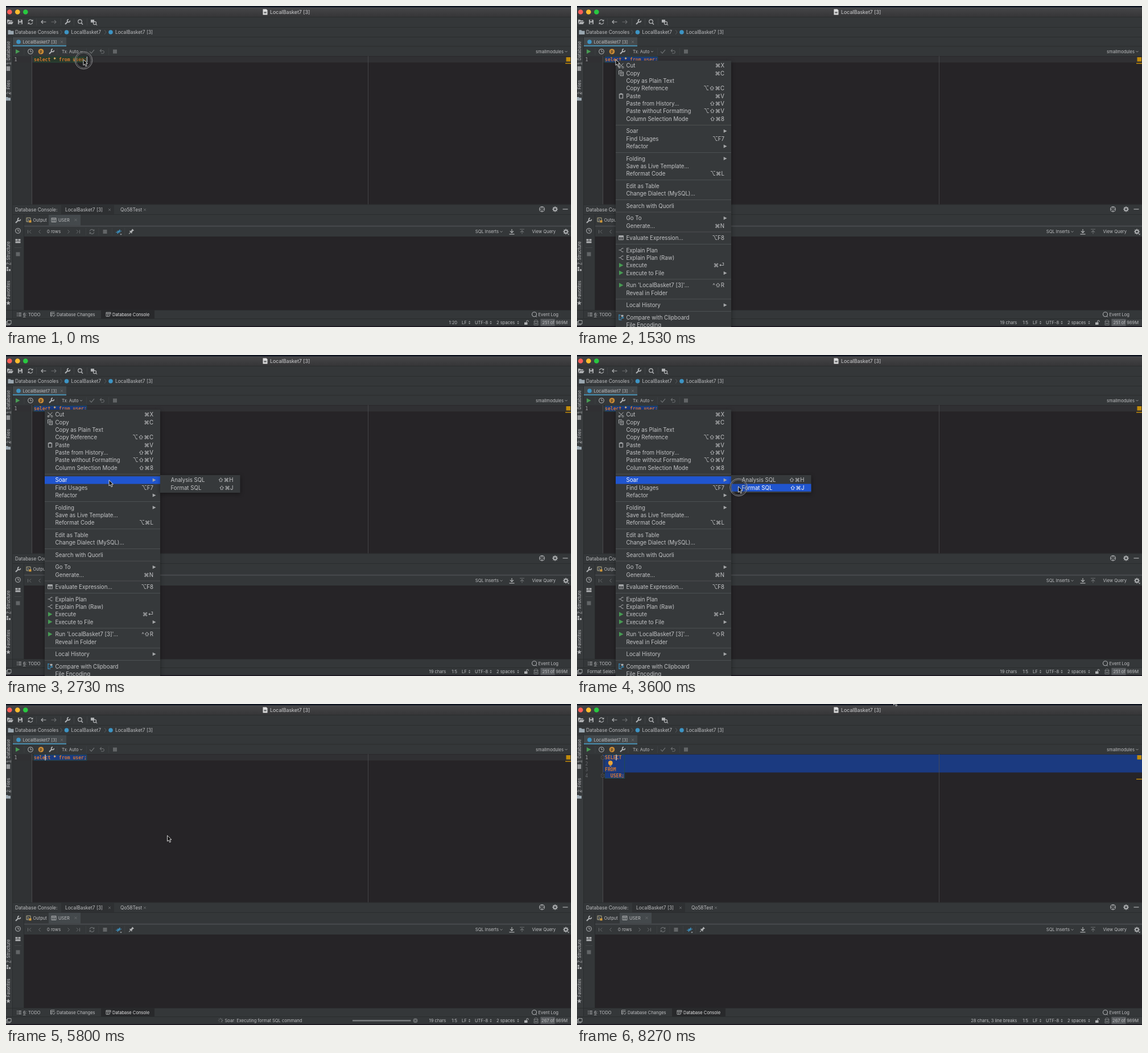
Write an HTML page with a canvas that moves like this. It is 993 px wide and 564 px high and loops after 8.34 s.

```html
<!DOCTYPE html>
<html lang="en">
<head>
<meta charset="utf-8">
<title>SQL console</title>
<style>
html, body { margin: 0; width: 100%; height: 100%; overflow: hidden; background: #343739; }
canvas { display: block; width: 993px; height: 564px; }
</style>
</head>
<body>
<canvas id="stage"></canvas>
<script>
const W = 993, H = 564, LOOP = 8340;
const canvas = document.getElementById('stage');
const dpr = window.devicePixelRatio || 1;
canvas.width = Math.round(W * dpr);
canvas.height = Math.round(H * dpr);
let g = canvas.getContext('2d');

const UI = 'Inter, "DejaVu Sans", sans-serif';
const MONO = '"DejaVu Sans Mono", "Liberation Mono", monospace';
const SMALL = 7.55, MED = 8.35, MENU = 9.7;
const CW = 4.89, LH = 10.55, X0 = 49;
const C = {
  editor: '#262427', panel: '#343739', tab: '#44494c', dark: '#28292b', line: '#292b2c',
  text: '#bdbec0', dim: '#6a6d6f', icon: '#afb1b3', blue: '#3d94c4', green: '#489b54',
  orange: '#d5782f', yellow: '#ffc66d', sel: '#1b3a80', hover: '#2055cf', warn: '#c08a0b',
  frame: '#25503f', menu: '#36393b', item: '#c3c4c6', bright: '#ffffff'
};
const DB = 'LocalBasket7', CONSOLE = DB + ' [3]';

// ---- helpers ----
function box(x, y, w, h, color) { g.fillStyle = color; g.fillRect(x, y, w, h); }
function dot(x, y, r, color) { g.fillStyle = color; g.beginPath(); g.arc(x, y, r, 0, 7); g.fill(); }
function ring(x, y, r, color, width = 1) {
  g.strokeStyle = color; g.lineWidth = width;
  g.beginPath(); g.arc(x, y, r, 0, 7); g.stroke();
}
function outline(x, y, w, h, color, width = 0.8) {
  g.strokeStyle = color; g.lineWidth = width; g.strokeRect(x, y, w, h);
}
// y is the middle of the capitals
function text(s, x, y, size = SMALL, color = C.text, align = 'left', weight = 400) {
  g.font = `${weight} ${size}px ${UI}`;
  g.fillStyle = color; g.textAlign = align; g.textBaseline = 'alphabetic';
  g.fillText(s, x, y + size * 0.36);
  return g.measureText(s).width;
}
function code(s, x, y, color, weight = 700) {
  g.font = `${weight} 8.12px ${MONO}`;
  g.fillStyle = color; g.textAlign = 'left'; g.textBaseline = 'alphabetic';
  g.fillText(s, x, y + 2.9);
}
function stroke(x, y, d, color = C.icon, width = 1) {
  g.save(); g.translate(x, y);
  g.strokeStyle = color; g.lineWidth = width; g.stroke(new Path2D(d));
  g.restore();
}
function fill(x, y, d, color = C.icon) {
  g.save(); g.translate(x, y);
  g.fillStyle = color; g.fill(new Path2D(d));
  g.restore();
}
const cross = (x, y) => stroke(x, y, 'M-2-2L2 2M2-2L-2 2', '#6f7274', 0.8);
const chevron = (x, y) => stroke(x, y, 'M-2-1L0 1L2-1', '#9a9c9e', 0.9);
const updown = (x, y) => fill(x, y, 'M-1.7-.8L0-3L1.7-.8ZM-1.7 .8L0 3L1.7 .8Z', '#9a9c9e');
const play = (x, y) => fill(x, y, 'M-3.5-4L4 0L-3.5 4Z', C.green);
const folder = (x, y, s = 1) => {
  g.save(); g.translate(x, y); g.scale(s, s);
  fill(0, 0, 'M-5-3.8h4l1.2 1.5H5V4H-5Z', '#9aa7b0'); g.restore();
};
function wrench(x, y) {
  stroke(x, y, 'M-4 4L1-1', C.icon, 2.1);
  stroke(x, y, 'M4.4-2.2A2.4 2.4 0 1 1 2-4.4', C.icon, 1.7);
}
function clock(x, y) { ring(x, y, 4.3, C.icon, 1.1); stroke(x, y, 'M0-2.8V.3H2.4'); }
function reload(x, y, color) {
  stroke(x, y, 'M-3.8-.8A3.8 3.8 0 0 1 3-2.4M3.8 .8A3.8 3.8 0 0 1-3 2.4', color, 1.2);
  fill(x, y, 'M4.4-4.4V-1H1ZM-4.4 4.4V1H-1Z', color);
}
function gear(x, y) {
  ring(x, y, 2.7, C.icon, 1.8);
  for (let i = 0; i < 8; i++) {
    const a = i * Math.PI / 4;
    dot(x + 4 * Math.cos(a), y + 4 * Math.sin(a), 0.9, C.icon);
  }
}
function grid(x, y, color = C.icon) { stroke(x, y, 'M-4-3.5H4V3.5H-4ZM-4-1.6H4M-1.3-1.6V3.5M1.3-1.6V3.5', color, 0.9); }
function bars(x, y) { stroke(x, y, 'M-4-2.5h1.5M-4 0h1.5M-4 2.5h1.5M-1.2-2.5H4M-1.2 0H4M-1.2 2.5H4'); }
function upright(s, y, underline) {
  g.save(); g.translate(4, y); g.rotate(-Math.PI / 2);
  text(s, 0, 0);
  if (underline) box(0, 3.8, 4.2, 0.7, C.text);
  g.restore();
}

// ---- fixed window parts ----
function drawWindow() {
  box(0, 0, W, H, C.panel);
  box(0, 0, W, 3, '#0b101c');
  const bar = g.createLinearGradient(0, 3, 0, 19);
  bar.addColorStop(0, '#454547'); bar.addColorStop(1, '#363638');
  g.fillStyle = bar; g.fillRect(0, 3, W, 16);
  box(0, 2.5, W, 0.8, '#5b5b5e');
  ['#ff5f57', '#febc2e', '#28c840'].forEach((c, i) => dot(6.3 + 14 * i, 10.5, 4.3, c));
  fill(455.5, 10.5, 'M-4-5H2L4-3V5H-4Z', '#dcdcdc');
  box(453.3, 10, 4.4, 3, '#77797b');
  text(CONSOLE, 464, 10.8, 8.9, '#cfcfd1');

  // main toolbar
  box(0, 19, W, 0.8, C.line);
  fill(7, 28, 'M-5 4V-4h3.5l1 1.3H4V-1H-2.5ZM-1.8-.2H6L3.8 4H-4Z');
  fill(25, 28, 'M-4-4H3L4-3V4H-4Z');
  box(22.8, 24.4, 3.6, 2.4, C.panel); box(22.6, 29, 4.8, 2.6, C.panel);
  reload(43, 28, C.icon);
  stroke(66, 28, 'M4.5 0H-4M-1-3L-4 0L-1 3', C.icon, 1.2);
  stroke(84, 28, 'M-4.5 0H4M1-3L4 0L1 3', C.dim, 1.2);
  wrench(108, 28);
  ring(130, 27.3, 3.3, C.icon, 1.3); stroke(130, 28, 'M2.2 1.8L5 4.6', C.icon, 1.5);
  box(149, 24, 6, 5, C.icon); ring(156, 30, 2.6, C.icon, 1.2); stroke(156, 30, 'M2 1.8L4 3.8', C.icon, 1.2);
  [53, 96, 119, 142].forEach(x => box(x, 22, 0.7, 12, '#45484a'));

  // breadcrumbs
  box(0, 37, W, 0.8, C.line);
  folder(8.5, 46);
  text('Database Consoles', 16, 46, MED);
  stroke(97, 46, 'M-1.5-4L1.5 0L-1.5 4', '#606365', 0.8);
  dot(106.5, 46, 3.8, C.blue);
  text(DB, 114.5, 46, MED);
  stroke(174.5, 46, 'M-1.5-4L1.5 0L-1.5 4', '#606365', 0.8);
  dot(184, 46, 3.8, C.blue);
  text(CONSOLE, 192, 46, MED);

  // editor tab and its toolbar
  box(0, 54, W, 0.8, C.line);
  box(12, 54.8, 94, 16, C.tab);
  box(12, 69, 94, 2, '#478bab');
  dot(22, 63, 3.8, C.blue);
  text(CONSOLE, 29.5, 63);
  cross(98, 63);
  box(106, 70.4, W - 106, 0.8, C.line);
  play(20.5, 80); clock(43, 80);
  dot(61.5, 80, 4.8, '#c98b36'); text('p', 61.5, 79.4, 7, '#3a3024', 'center', 600);
  wrench(80, 80);
  text('Tx: Auto', 98, 80); chevron(132, 80);
  stroke(151, 80, 'M-4 0L-1 3L4-3', C.dim, 1.2);
  stroke(169, 80, 'M-3.5-1.5H1.5A2.4 2.4 0 0 1 1.5 3.2H-2M-1.3-4L-3.8-1.5L-1.3 1', C.dim, 1.1);
  box(188, 76.5, 7, 7, '#626567');
  [31.5, 89.5, 141, 180].forEach(x => box(x, 74, 0.7, 12, '#404345'));
  text('smallmodules', 980, 80, SMALL, C.text, 'right'); chevron(984.5, 80);

  // editor
  box(11, 88, 34, 260.5, '#303234');
  box(45, 88, W - 45, 260.5, C.editor);

  // left stripe
  box(0, 54.8, 11, 494, '#383b3d');
  box(11, 54.8, 0.8, 494, C.line);
  upright('1: Database', 103, true);
  stroke(4, 110, 'M-3.2-3H3.2M-3.2-1H3.2M-3.2 1H3.2M-3.2 3H3.2', C.icon, 1.3);
  upright('2: Files', 155.5, true);
  folder(4, 163, 0.8);
  upright('7: Structure', 455, true);
  fill(4, 462, 'M-3-3.5h3v3h-3ZM-3 .5h3v3h-3ZM1 .5h3v3h-3Z');
  upright('Favorites', 515);
  const star = [];
  for (let i = 0; i < 10; i++) {
    const r = i % 2 ? 1.8 : 4.4, a = i * Math.PI / 5;
    star.push(`${(r * Math.sin(a)).toFixed(2)} ${(-r * Math.cos(a)).toFixed(2)}`);
  }
  fill(4, 522, 'M' + star.join('L') + 'Z');

  // console panel
  box(11.8, 348.5, W, 0.8, C.line);
  box(97, 349.3, 93, 17, '#2e3032');
  text('Database Console:', 16, 357.5, MED);
  text(CONSOLE, 104, 357.5, MED); cross(182, 358);
  text('Qo58Test', 201, 357.5, MED); cross(244, 358);
  ring(942, 357, 4.4, C.icon, 1.1);
  stroke(942, 357, 'M0-4V-1.3M0 4V1.3M-4 0H-1.3M4 0H1.3', C.icon, 1.1);
  gear(965, 357);
  stroke(983, 357, 'M-4.5 0H4.5', C.icon, 1.2);
  box(11.8, 366, W, 0.8, C.line);
  box(75, 366.8, 56, 19, C.tab);
  stroke(39.5, 376, 'M-3.5-3.8H3.5V3H-3.5Z', '#b7b08a', 1);
  stroke(39.5, 376, 'M-1.8-2L.3 0L-1.8 2'); box(40.5, 376.5, 4, 4, '#d39a3a');
  text('Output', 47.5, 375.8);
  grid(84, 376); text('USER', 92, 375.8); cross(122.5, 375.8);
  box(31.5, 385.5, W, 2.5, '#44474a');
  box(31, 366.8, 0.8, 167, C.line);
  wrench(21, 377); clock(21, 395);
  fill(21, 413, 'M-4.5-3.5h4v3h-4ZM.5-3.5h4v3h-4ZM-4.5 .5h9v3h-9Z');
  box(15, 424, 12, 0.7, '#4a4d4f');
  box(17.5, 432.5, 7, 7, '#626567');
  stroke(41, 396.5, 'M3-3L0 0L3 3M-2.5-3V3', C.dim, 1);
  stroke(59, 396.5, 'M1.5-3L-1.5 0L1.5 3', C.dim, 1);
  text('0 rows', 72, 396.6);
  stroke(110, 396.5, 'M-1.5-3L1.5 0L-1.5 3', C.dim, 1);
  stroke(127, 396.5, 'M-3-3L0 0L-3 3M2.5-3V3', C.dim, 1);
  reload(151, 396.5, C.dim);
  box(170.5, 393, 7, 7, '#626567');
  [140, 162.5, 186, 208].forEach(x => box(x, 390, 0.7, 13, '#404345'));
  stroke(198, 396.5, 'M-5 1H0M-2.5-1.5L0 1L-2.5 3.5M5-1H0M2.5-3.5L0-1L2.5 1.5', C.blue, 1.2);
  fill(202, 401.5, 'M-1.8-1H1.8L0 1Z');
  g.save(); g.translate(220, 396.5); g.rotate(Math.PI / 4);
  fill(0, 0, 'M-2-5H2V-4L1.4-3.5V-.8L3 .8V1.6H.5V5.5H-.5V1.6H-3V.8L-1.4-.8V-3.5L-2-4Z');
  g.restore();
  text('SQL Inserts', 866, 396.6, SMALL, C.text, 'right'); chevron(870.5, 396.5);
  stroke(889, 396.5, 'M0-4.5V2M-3-1L0 2L3-1M-4.5 4.3H4.5', C.icon, 1.2);
  stroke(907, 396.5, 'M0 4V-2M-3 1L0-2L3 1M-4-4.2H4', C.dim, 1.1);
  text('View Query', 966, 396.6, SMALL, C.text, 'right');
  gear(984, 396.5); fill(988.5, 401.5, 'M-1.8-1H1.8L0 1Z');
  box(31.8, 405, W, 129, C.editor);

  // tool window bar
  box(0, 534, W, 0.8, C.line);
  box(167, 534.5, 94, 14.5, C.dark);
  bars(23, 542); text('6: TODO', 30, 542); box(30, 546.2, 4.4, 0.7, C.text);
  stroke(82, 541.5, 'M-3.5-3.5H3.5M-3.5-1H3.5M-3.5 1.5H0M-3.5-3.5V3.5H-1M0 2L2 4L4.5 .5', C.icon, 0.9);
  text('Database Changes', 89, 542);
  grid(180, 541.8); box(181, 542.5, 4, 4, C.dark); stroke(182.5, 544, 'M-1.5-1.5L.5 0L-1.5 1.5', C.icon, 0.9);
  text('Database Console', 187, 542, SMALL, '#e4e4e5');
  ring(928.5, 541.7, 4, C.icon, 1.1); stroke(928.5, 541.7, 'M2.5 3L4.5 4.8');
  text('Event Log', 971, 542, SMALL, C.text, 'right');

  // status bar
  box(0, 549, W, 0.8, C.line);
  stroke(5, 556, 'M-2.5-3.5H4V2.5H-2.5ZM-2.5-1.5H-4.5V4.2H2V2.5', C.icon, 0.9);
  text('LF', 801, 556.4); updown(814.5, 556.3);
  text('UTF-8', 824, 556.4); updown(852, 556.3);
  text('2 spaces', 862, 556.4); updown(900, 556.3);
  box(911, 555.8, 5.5, 4.2, C.icon);
  stroke(914, 555.8, 'M.8 0V-1.8A1.6 1.6 0 0 1 4-1.8V-.8', C.icon, 1);
  ring(931.5, 555, 3.4, '#808385', 0.9);
  stroke(931.5, 556, 'M-4-1.5H4M-2 1.5H2M-3.5 1V4.5H3.5V1', '#808385', 0.9);
}

const base = document.createElement('canvas');
function bake() {
  base.width = canvas.width; base.height = canvas.height;
  const screen = g;
  g = base.getContext('2d');
  g.scale(dpr, dpr);
  drawWindow();
  g = screen;
}

// ---- context menu ----
const ROWS = [
  ['Cut', '⌘X', 'cut'], ['Copy', '⌘C', 'copy'], ['Copy as Plain Text'], ['Copy Reference', '⌥⇧⌘C'],
  ['Paste', '⌘V', 'paste'], ['Paste from History...', '⇧⌘V'], ['Paste without Formatting', '⌥⇧⌘V'],
  ['Column Selection Mode', '⇧⌘8'], 0,
  ['Soar', '>'], ['Find Usages', '⌥F7'], ['Refactor', '>'], 0,
  ['Folding', '>'], ['Save as Live Template...'], ['Reformat Code', '⌥⌘L'], 0,
  ['Edit as Table'], ['Change Dialect (MySQL)...'], 0,
  ['Search with Quorli'], 0,
  ['Go To', '>'], ['Generate...', '⌘N'], 0,
  ['Evaluate Expression...', '⌥F8', 'calc'], 0,
  ['Explain Plan', '', 'plan'], ['Explain Plan (Raw)', '', 'plan'],
  ['Execute', '⌘⏎', 'run'], ['Execute to File', '>', 'run'], 0,
  [`Run '${CONSOLE}'...`, '^⇧R', 'run'], ['Reveal in Folder'], 0,
  ['Local History', '>'], 0,
  ['Compare with Clipboard', '', 'compare'], ['File Encoding']
];
const SUBROWS = [['Analysis SQL', '⇧⌘H'], ['Format SQL', '⇧⌘J']];
const ROW = 13.33, GAP = 8.22;
const MENU_ICONS = {
  cut: (x, y) => { stroke(x, y, 'M-4-4L2.5 2M-4 4L4-4'); ring(x - 3, y + 3, 1.5, C.icon, 0.9); ring(x + 3, y + 3, 1.5, C.icon, 0.9); },
  copy: (x, y) => { stroke(x, y, 'M-1.5-2H4V4.5H-1.5ZM-4 2.5V-4.3H1.5M0 0H2.6M0 2H2.6'); },
  paste: (x, y) => { stroke(x, y, 'M-3-3.2H3V4H-3Z', C.icon, 1.2); box(x - 1.6, y - 4.6, 3.2, 2.2, C.icon); },
  calc: (x, y) => { grid(x, y); box(x - 4, y - 4, 8, 2.2, C.icon); },
  plan: (x, y) => { stroke(x, y, 'M-4 0H-1L1.5-3H4M-1 0L1.5 3H4'); },
  run: (x, y) => play(x, y),
  compare: (x, y) => { stroke(x, y, 'M-4.5-4H-1M-3.5-3V4.5H1M-1 1.5H4M1.5-1.5L4.5 1.5', C.blue, 1.2); box(x, y - 4, 4, 3, C.icon); }
};
function popup(x, y, w, h) {
  g.save();
  g.shadowColor = 'rgba(0,0,0,0.4)'; g.shadowBlur = 7 * dpr; g.shadowOffsetY = 2 * dpr;
  box(x, y, w, h, C.menu);
  g.restore();
}
function menuRow([label, key, icon], x, w, y, active) {
  const color = active ? C.bright : C.item;
  if (active) box(x, y - ROW / 2, w, ROW, C.hover);
  text(label, x + 18.5, y, MENU, color);
  if (icon) MENU_ICONS[icon](x + 9.5, y - 0.3);
  if (key === '>') fill(x + w - 10.5, y, 'M-2.8-3L3 0L-2.8 3Z', '#a5a7a9');
  else if (key) text(key, x + w - 12, y, MENU, color, 'right');
}
function drawMenu(mouse, submenu) {
  const near = y => Math.abs(mouse.y - y) < ROW / 2;
  popup(68, 96, 203, H);
  let y = 105;
  for (const row of ROWS) {
    if (row) {
      menuRow(row, 68, 203, y, submenu ? row[0] === 'Soar' : near(y) && mouse.t > 1650);
      y += ROW;
    } else {
      box(68, y - ROW / 2 + GAP / 2 - 0.3, 203, 0.9, '#505355');
      y += GAP;
    }
  }
  if (!submenu) return;
  popup(271, 211, 140.5, 31);
  SUBROWS.forEach((row, i) => {
    const cy = 219.8 + ROW * i;
    menuRow(row, 271, 140.5, cy, mouse.x > 271 && near(cy));
  });
}

// ---- motion ----
const PATH = [
  [0, 136, 94], [120, 136, 94], [700, 46, 95], [820, 46, 95], [1050, 68, 94], [1600, 68, 94],
  [2070, 110, 206], [2250, 113, 218], [2500, 122, 219], [3050, 277, 221], [3300, 283.5, 231],
  [7200, 283.5, 231], [7750, 556.5, -8.5], [LOOP, 556.5, -8.5]
];
function mouseAt(t) {
  let i = 1;
  while (i < PATH.length - 1 && PATH[i][0] <= t) i++;
  const [t0, x0, y0] = PATH[i - 1], [t1, x1, y1] = PATH[i];
  const p = (t - t0) / (t1 - t0), e = p * p * (3 - 2 * p);
  return { t, x: x0 + (x1 - x0) * e, y: y0 + (y1 - y0) * e };
}
const T = { bulb: 950, menu: 1450, sub: 2450, close: 3690, task: 3950, heap: 4800, format: 6500, bulb2: 7600 };

function drawBulb() {
  dot(58.8, 103.4, 3.9, '#e9a53a');
  box(57, 106.5, 3.6, 1.6, '#d08d2c');
  box(57.3, 108.6, 3, 1.2, '#a5a7a9');
}

function drawEditor(t, col, selected) {
  const done = t >= T.format;
  const y = n => 94.2 + LH * n;
  if (done) {
    box(X0, 88.7, W - X0, 3 * LH, C.sel);
    box(X0, 88.7 + 3 * LH, 7 * CW, LH, C.sel);
    outline(X0, 89, 7.1 * CW, 4 * LH - 0.6, C.frame);
    box(45.6, 88.7, 3.4, 3 * LH, '#1f3466');
  } else {
    box(11.8, 88.7, W, LH, '#303033');
    box(X0, 89, 19 * CW, 10, '#28382b');
    if (!selected) box(X0 + 14 * CW, 89, 4 * CW, 10, '#33472f');
    box(X0 + (19 - selected) * CW, 88.7, selected * CW, LH, C.sel);
    outline(X0, 89.2, 19 * CW, LH - 0.9, C.frame);
  }
  box(45, 88, 0.8, 260.5, '#545558');
  box(636, 88, 0.8, 260.5, '#4b4b4f');
  code('1', 14.5, y(0), '#a5a6a8', 400);
  if (done) {
    for (let n = 1; n < 4; n++) code(n + 1, 14.5, y(n), '#64676a', 400);
    for (const n of [0, 3]) {
      box(42.8, y(n) - 2.6, 5, 5.2, C.editor);
      outline(42.8, y(n) - 2.6, 5, 5.2, '#5f6264', 0.7);
      stroke(45.3, y(n), 'M-1.3 0H1.3', '#7a7d7f', 0.7);
    }
    code('SELECT', X0, y(0), C.orange);
    if (t < T.bulb2) code('*', X0 + 2 * CW, y(1), C.yellow);
    code('FROM', X0, y(2), C.orange);
    code('USER;', X0 + 2 * CW, y(3), C.orange);
  } else {
    code('select', X0, y(0), C.orange);
    code('*', X0 + 7 * CW, y(0), C.yellow);
    code('from user;', X0 + 9 * CW, y(0), C.orange);
  }
  box(984.5, 90, 7.5, 7.5, C.warn);
  box(983, done ? 131.3 : 100, 10, 1.5, C.warn);

  const focus = t < T.menu || t >= T.close;
  const phase = done ? t - 7000 + LOOP : t >= T.close ? t - 3600 : t < 900 ? 0 : t - 900;
  const blinkOn = done ? (t - 6000) % 1000 < 500 : phase % 1000 < 500;
  if (focus && blinkOn) box(X0 + col * CW - 0.2, 88.9, 1.3, 10.2, '#d6d6d8');
  if ((t >= T.bulb && t < T.menu) || t >= T.bulb2) drawBulb();
}

function drawStatus(t, col, selected, mouse) {
  const pos = '1:' + (col + 1);
  const w = text(pos, 793, 556.4, SMALL, C.text, 'right');
  const count = t >= T.format ? '28 chars, 3 line breaks' : selected ? selected + ' chars' : '';
  text(count, 793 - w - 10, 556.4, SMALL, C.text, 'right');

  box(939, 549.8, 54, 13, '#3b3e40');
  box(939.5, 549.8, 25, 13, '#5a5d60');
  text((t < T.heap ? 251 : 267) + ' of 989M', 987, 556.4, SMALL, C.text, 'right');

  if (t >= T.sub && t < T.close && mouse.x > 271)
    text((mouse.y < 226.4 ? 'Analysis' : 'Format') + ' Selected SQL', 18, 556.4);

  if (t >= T.task && t < T.format) {
    const step = Math.floor(t / 100);
    for (let i = 0; i < 8; i++) {
      const a = i * Math.PI / 4, c = Math.cos(a), s = Math.sin(a);
      g.strokeStyle = `rgba(190,192,194,${0.15 + 0.65 * ((i - step + 8000) % 8) / 7})`;
      g.lineWidth = 1;
      g.beginPath(); g.moveTo(377 + 2 * c, 556 + 2 * s); g.lineTo(377 + 4.3 * c, 556 + 4.3 * s); g.stroke();
    }
    text('Soar: Executing format SQL command', 384.5, 556.4);
    box(609, 555, 102.5, 2.6, '#75787a');
    dot(719.5, 556.2, 4, '#6b6e70');
    stroke(719.5, 556.2, 'M-1.6-1.6L1.6 1.6M1.6-1.6L-1.6 1.6', C.panel, 1);
  }
}

function drawPointer(t, { x, y }) {
  if (t < 780 || (t > 1320 && t < 1460) || (t > 3500 && t < T.close)) {
    dot(x + 0.5, y + 1.5, 15.5, 'rgba(20,20,22,0.16)');
    ring(x + 0.5, y + 1.5, 15.3, '#a2a2a4', 0.9);
    ring(x + 0.5, y + 1.5, 13.2, '#77777a', 0.9);
  }
  const d = 'M0 0V10.2L2.4 8L4.1 12L6 11.2L4.3 7.3H7.4Z';
  fill(x, y, d, '#0c0c0d');
  stroke(x, y, d, '#ececec', 0.9);
}

function draw(t) {
  const mouse = mouseAt(t);
  let col = 4;
  if (t <= 120) col = 19;
  else if (t < 760) col = Math.max(0, Math.min(19, Math.round((mouse.x + 4 - X0) / CW)));
  else if (t < T.menu) col = 0;
  const selected = t < T.menu ? 19 - col : 19;

  g.setTransform(1, 0, 0, 1, 0, 0);
  g.drawImage(base, 0, 0);
  g.setTransform(dpr, 0, 0, dpr, 0, 0);
  drawEditor(t, col, selected);
  drawStatus(t, col, selected, mouse);
  box(0, 562.5, W, 1.5, '#17121c');
  if (t >= T.menu && t < T.close) drawMenu(mouse, t >= T.sub);
  drawPointer(t, mouse);
}

bake();
const start = performance.now();
function tick() {
  draw((performance.now() - start) % LOOP);
  requestAnimationFrame(tick);
}
tick();
</script>
</body>
</html>
```
